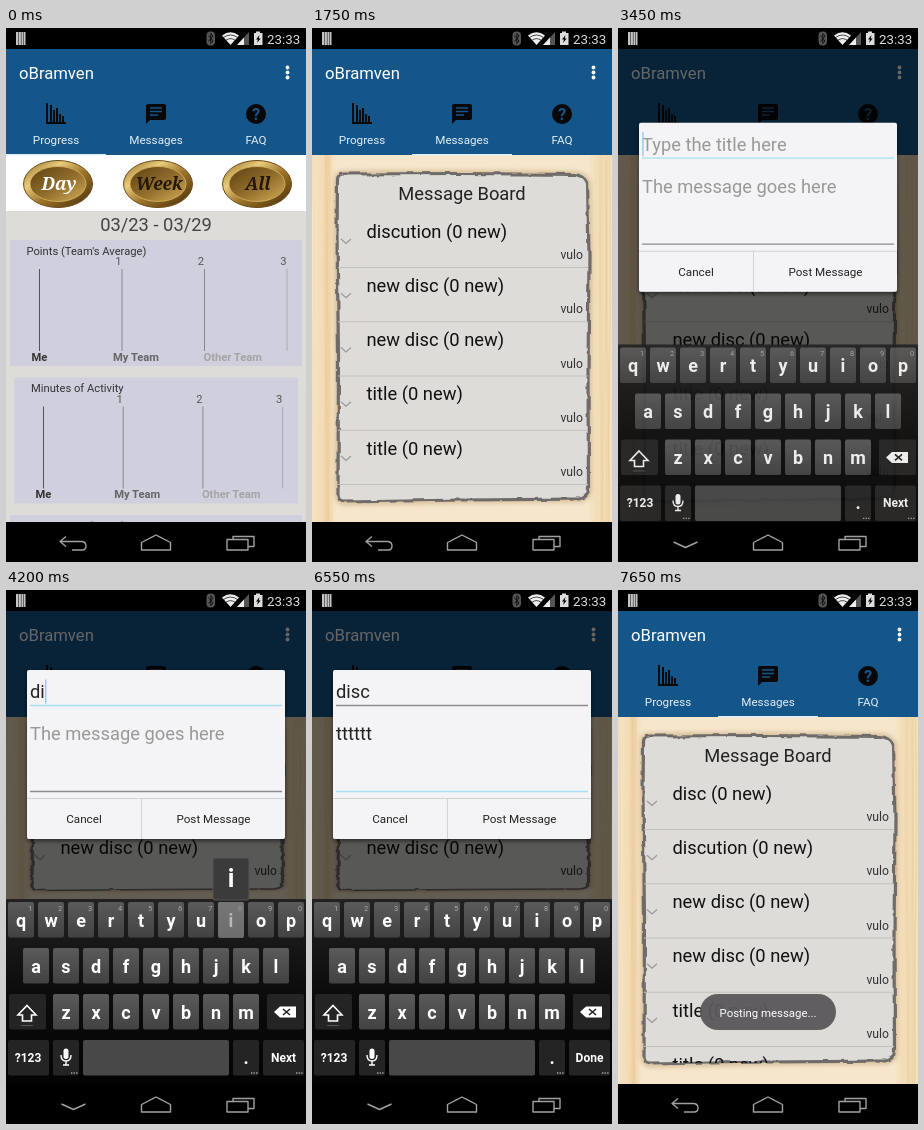
Write an HTML page that moves like this. It is 300 by 534 pixels and loops after 8000 ms.

```html
<!DOCTYPE html>
<html lang="en">
<head>
<meta charset="utf-8">
<style>
html, body { margin: 0; height: 100%; overflow: hidden; background: #000; }
svg { display: block; width: 100vw; height: 100vh; font-family: Roboto, sans-serif; }
.big { font-size: 18.33px; }
.small { font-size: 11.67px; }
.mid { text-anchor: middle; }
.end { text-anchor: end; }
.chart { font-size: 11.2px; }
.btn { font: italic bold 17.5px "Noto Serif", serif; text-anchor: middle; }
.bold { font-weight: 700; }
.icon { fill: none; stroke: #a0a0a0; stroke-width: 1.4; stroke-linejoin: round; }
</style>
</head>
<body>
<svg viewBox="0 0 300 534">
  <defs>
    <linearGradient id="rim" x2="1" y2="1">
      <stop stop-color="#8c6420"/><stop offset=".3" stop-color="#e9cc7c"/>
      <stop offset=".55" stop-color="#a0752a"/><stop offset="1" stop-color="#3f2806"/>
    </linearGradient>
    <linearGradient id="face" x2="1" y2="1">
      <stop stop-color="#5d3f10"/><stop offset=".55" stop-color="#94702f"/><stop offset="1" stop-color="#d3ab55"/>
    </linearGradient>
    <linearGradient id="plank">
      <stop stop-color="#f5e3c3"/><stop offset=".05" stop-color="#f2d9b0"/>
      <stop offset=".08" stop-color="#f6e6cb"/><stop offset=".92" stop-color="#f6e6cb"/>
      <stop offset=".95" stop-color="#f3dcb6"/><stop offset="1" stop-color="#f4e0bd"/>
    </linearGradient>
    <linearGradient id="kbBg" x2="0" y2="1">
      <stop stop-color="#222"/><stop offset=".5" stop-color="#0c0c0c"/><stop offset="1" stop-color="#030303"/>
    </linearGradient>
    <linearGradient id="key" x2="0" y2="1">
      <stop stop-color="#5a5a5a"/><stop offset="1" stop-color="#424242"/>
    </linearGradient>
    <filter id="shadow" x="-10%" y="-10%" width="120%" height="125%">
      <feDropShadow dx="0" dy="2" stdDeviation="2" flood-opacity=".55"/>
    </filter>
    <filter id="rough" color-interpolation-filters="sRGB">
      <feTurbulence type="fractalNoise" baseFrequency=".07" numOctaves="2" seed="3"/>
      <feDisplacementMap in="SourceGraphic" scale="5" xChannelSelector="R" yChannelSelector="G"/>
      <feGaussianBlur stdDeviation=".7"/>
    </filter>
    <filter id="soft"><feGaussianBlur stdDeviation="2"/></filter>
    <clipPath id="listClip"><rect id="listBox" x="24" y="180" width="253" height="293"/></clipPath>
    <path id="board" d="M31 19L150 18.500L262 19.500Q273 20 275.500 28L277 100L276 220L276.500 334Q276 343 267 344L150 345L32 347Q26 346 26 339L26.500 200L25 80L25.500 24Q26 19 31 19Z"/>
  </defs>

  <g id="progress">
    <rect y="127" width="300" height="367" fill="#dddcd8"/>
    <rect y="127" width="300" height="56" fill="#fff"/>
    <g id="buttons"></g>
    <text class="big mid" x="150" y="203" fill="#444">03/23 - 03/29</text>
    <g id="charts"></g>
  </g>

  <g id="messages">
    <g id="wood">
      <rect width="300" height="367" fill="url(#plank)"/>
      <g id="grain" fill="none" stroke="#e0bd85"></g>
      <use href="#board" fill="none" stroke="#c4a880" stroke-width="7" opacity=".6" filter="url(#soft)"/>
      <use href="#board" fill="#dedcd8" stroke="#6f6b69" stroke-width="3.2" filter="url(#rough)"/>
    </g>
    <text class="big mid" x="150" y="172" fill="#222">Message Board</text>
    <g clip-path="url(#listClip)"><g id="rows"></g></g>
  </g>

  <g id="header">
    <rect y="21" width="300" height="106" fill="#15568a"/>
    <text x="13" y="51" font-size="16.67" fill="#fff">oBramven</text>
    <g fill="#fff"><circle cx="281.500" cy="39.500" r="1.9"/><circle cx="281.500" cy="44.500" r="1.9"/><circle cx="281.500" cy="49.500" r="1.9"/></g>
    <rect id="tabPress" x="100" y="68" width="100" height="59" fill="#fff"/>
    <path d="M41 75V95H60M45 77V94M48 82V94M51 80V94M54 86V94M57 88V94" fill="none" stroke="#080808" stroke-width="1.9"/>
    <path d="M142 76H158Q160 76 160 78V90Q160 92 158 92H144L140 96V78Q140 76 142 76Z" fill="#080808"/>
    <path d="M144 80H156M144 83.500H156M144 87H152" stroke="#15568a" stroke-width="1.4"/>
    <circle cx="250" cy="86" r="10" fill="#080808"/>
    <text class="mid bold" x="250" y="92" font-size="16.500" fill="#15568a">?</text>
    <g class="small mid" fill="#e4eef5">
      <text x="50" y="116">Progress</text><text x="150" y="116">Messages</text><text x="250" y="116">FAQ</text>
    </g>
    <rect id="bar" y="126" width="100" height="1.700" fill="#e4f0f8"/>
  </g>

  <g id="menu" filter="url(#shadow)">
    <rect x="124" y="27" width="172" height="122" rx="1.5" fill="#f4f3f5"/>
    <rect id="menuPress" x="124" y="28" width="172" height="40" fill="#ccc"/>
    <g font-size="13.33" fill="#222">
      <text x="138" y="53">Post Message</text><text x="138" y="93">Refresh</text><text x="138" y="133">Settings</text>
    </g>
  </g>
  <rect id="dim" y="21" width="300" height="473"/>

  <g id="dialog">
    <rect width="258" height="169" rx="2" fill="#f4f3f5" filter="url(#shadow)"/>
    <rect id="postPress" x="114" y="128" width="144" height="41" fill="#bfe3f2"/>
    <text id="title" class="big" x="3" y="28"></text>
    <text id="body" class="big" x="3" y="70"></text>
    <path id="line1" d="M3 35.5H255" stroke-width="1.3"/>
    <path id="line2" d="M3 121.5H255" stroke-width="1.3"/>
    <rect id="caret" width="1.4" height="24" fill="#8fcdf0"/>
    <path d="M0 128.5H258M114.5 128V169" stroke="#d2d1d3"/>
    <g class="small mid" fill="#222"><text x="57" y="153">Cancel</text><text x="186.5" y="153">Post Message</text></g>
    <circle id="touch" cx="167" cy="80" r="8.5" fill="#fff" fill-opacity=".4" stroke="#e6e5e8"/>
  </g>

  <g id="keyboard">
    <rect y="309" width="300" height="185" fill="url(#kbBg)"/>
    <g id="keys"></g>
    <path d="M21 415.500L30 425H25.500V431H16.500V425H12Z" fill="none" stroke="#fff" stroke-width="1.6"/>
    <path d="M15 435.500H27" stroke="#555"/>
    <path d="M268 422L274 416.500H290V427.500H274Z" fill="#fff"/>
    <path d="M277 419L284 425M284 419L277 425" stroke="#222" stroke-width="1.6"/>
    <rect x="57.500" y="458.500" width="5" height="10.500" rx="2.500" fill="#fff"/>
    <path d="M55 465Q55 471 60 471T65 465M60 471V475M57 475H63" fill="none" stroke="#fff" stroke-width="1.4"/>
    <g class="mid bold" fill="#fff">
      <text x="22" y="472" font-size="12">?123</text><text x="240" y="474" font-size="18">.</text>
      <text id="action" x="277.500" y="472" font-size="12"></text>
    </g>
    <path d="M65 483H72M245 483H252M290 483H297" stroke="#aaa" stroke-width="1.3" stroke-dasharray="1.3 1.3"/>
    <g id="pop">
      <rect x="-13" y="-18" width="26" height="36" rx="2" fill="#8a8a8a" fill-opacity=".6"/>
      <rect x="-18" y="-62" width="36" height="42" rx="2" fill="#3b3b3b" stroke="#555"/>
      <text id="popText" class="mid bold" y="-33" font-size="25" fill="#fff"></text>
    </g>
  </g>

  <rect width="300" height="21"/>
  <path d="M10 4H12.200V17H10ZM12.700 4H14.900V17H12.700ZM15.400 4H17.200V17H15.400ZM17.700 4H19.500V17H17.700Z" fill="#c4c4c4"/>
  <rect x="200.500" y="3.500" width="8.500" height="14" rx="4" fill="#555"/>
  <path d="M202.500 7.500L207 13L204.800 15.500V5.500L207 8L202.500 13.500" fill="none" stroke="#111"/>
  <path d="M216 7.500Q224.500 1 233 7.500L224.500 17Z" fill="#eee"/>
  <path d="M217.500 9.500Q224.500 4.500 231.500 9.500M220 12.200Q224.500 9 229 12.200" fill="none" stroke="#000" stroke-width=".7"/>
  <path d="M231 17L243 4V17Z" fill="#555"/><path d="M231 17L238 9.500V17Z" fill="#eee"/>
  <path d="M248 5H250V3.500H254V5H256.500V17H248Z" fill="#ddd"/>
  <path d="M253.500 7L250 11.500H252L251 15L254.700 10.500H252.700Z"/>
  <text x="261" y="15.500" font-size="13.33" fill="#ddd">23:33</text>

  <rect y="494" width="300" height="40"/>
  <path id="back" class="icon"/>
  <path class="icon" d="M135.500 522V514.500L150 507L164.500 514.500V522ZM221 511.500H242V522H221ZM227 511V508.500H248V518.500H242.500"/>

  <g id="toast">
    <rect x="82" y="404" width="136" height="36" rx="18" fill="#5a585b" fill-opacity=".95"/>
    <text class="mid" x="150" y="426.500" font-size="11.400" fill="#fff">Posting message...</text>
  </g>
</svg>
<script>
const $ = id => document.getElementById(id);
const set = (id, attrs) => { for (const k in attrs) $(id).setAttribute(k, attrs[k]); };
const fade = (id, a) => set(id, { opacity: a, visibility: a > 0 ? 'visible' : 'hidden' });
const clamp = v => Math.max(0, Math.min(1, v));
const out = (u, power) => 1 - (1 - u) ** power;

// Static parts
$('buttons').innerHTML = [['Day', 52, '#fff'], ['Week', 152, '#241808'], ['All', 251, '#241808']].map(([s, x, c]) =>
  `<ellipse cx="${x}" cy="156" rx="34.5" ry="23.5" fill="url(#rim)" stroke="#6b4a16"/>
   <ellipse cx="${x}" cy="156" rx="28" ry="17.5" fill="url(#face)" stroke="#d9b662" stroke-width=".8"/>
   <text class="btn" x="${x + 1}" y="162" fill="${c}">${s}</text>`).join('');

function chart(name, x, y, width, first, gap) {
  const lines = [0, 1, 2, 3].map(i => {
    const lx = first + i * gap;
    return `<path d="M${lx} ${y + 29}V${y + 111}" stroke="${['#555', '#888', '#888', '#aaa'][i]}"/>` +
      (i ? `<text class="mid" x="${lx - 3.5}" y="${y + 25}" fill="#555">${i}</text>` : '');
  }).join('');
  const labels = [['Me', -8, '#333'], ['My Team', gap - 9, '#666'], ['Other Team', gap * 2 - 1, '#a5a5a5']].map(
    ([s, dx, c]) => `<text class="bold" x="${first + dx}" y="${y + 120.5}" fill="${c}">${s}</text>`).join('');
  return `<g class="chart"><rect x="${x}" y="${y}" width="${width}" height="126" fill="#cfcfdd"/>
    <text x="${x + 16.5}" y="${y + 14.5}" fill="#333">${name}</text>${lines}${labels}</g>`;
}
$('charts').innerHTML = chart("Points (Team's Average)", 4, 212, 292, 33.5, 82.5) +
  chart('Minutes of Activity', 8.5, 349.5, 283.5, 37.5, 79.7) +
  chart('Time Sitting (hours)', 4, 487, 292, 33.5, 82.5);

// Grain runs along the two side planks
let seed = 7;
const rnd = () => (seed = seed * 16807 % 2147483647) / 2147483647;
$('grain').innerHTML = Array.from({ length: 14 }, (_, i) => {
  const x = (i % 2 ? 281 : 1) + rnd() * 18, bend = rnd() * 5 - 2.5;
  return `<path d="M${x} 0Q${x + bend} 120 ${x} 200T${x - bend} 367" stroke-width="${1 + rnd() * 2}" opacity="${.08 + rnd() * .2}"/>`;
}).join('');

const rowGap = 54.25;
$('rows').innerHTML = ['disc', 'discution', 'new disc', 'new disc', 'title', 'title'].map((s, i) =>
  `<g id="row${i}" transform="translate(0 ${i * rowGap})">
   <text class="big" x="54.5" y="209.5" fill="#111">${s} (0 new)</text>
   <text class="end" x="271" y="231" font-size="12.2" fill="#333">vulo</text>
   <path d="M29 211L34 215.5L39 211" fill="none" stroke="#999" stroke-width="1.2"/>
   <path d="M26 239.5H276" stroke="#c3c1bd"/></g>`).join('');

const keyAt = {};
const cap = (x, y, w, fill) => `<rect x="${x}" y="${y}" width="${w}" height="35.5" rx="2" fill="${fill}"/>`;
$('keys').innerHTML = [['qwertyuiop', 15], ['asdfghjkl', 30], ['zxcvbnm', 60]].map(([letters, x0], r) =>
  [...letters].map((c, i) => {
    const x = x0 + i * 30, y = 312 + r * 46;
    keyAt[c] = [x, y + 18];
    return cap(x - 13, y, 26, 'url(#key)') +
      `<text class="mid bold" x="${x}" y="${y + 24.5}" font-size="18" fill="#fff">${c}</text>` +
      (r ? '' : `<text class="mid" x="${x + 9}" y="${y + 8.5}" font-size="7.5" fill="#aaa">${(i + 1) % 10}</text>`);
  }).join('')).join('') +
  [[3, 404, 37], [261, 404, 37], [2, 450, 41], [47, 450, 26], [227, 450, 26], [257, 450, 41]].map(
    k => cap(...k, '#242424')).join('') + cap(77, 450, 146, '#484848');

// Key presses: time, letter, hold
const titleKeys = [[3800, 'd', 200], [4150, 'i', 150], [4350, 's', 150], [4550, 'c', 150]];
const bodyKeys = Array.from({ length: 6 }, (_, i) => [5350 + i * 90, 't', 50]);
const allKeys = [...titleKeys, ...bodyKeys];

function field(id, keys, hint, t) {
  const typed = keys.filter(k => k[0] <= t).map(k => k[1]).join('');
  const el = $(id);
  el.textContent = typed || hint;
  el.setAttribute('fill', typed ? '#222' : '#999');
  return typed ? el.getComputedTextLength() : 0;
}

function draw(t) {
  const ramp = (a, b) => clamp((t - a) / (b - a));
  const during = (a, b) => t >= a && t < b ? 1 : 0;

  // Tab change
  const slide = out(ramp(480, 750), 3);
  set('progress', { transform: `translate(${-300 * slide} 0)` });
  set('messages', { transform: `translate(${300 - 300 * slide} 0)` });
  set('bar', { x: 100 * slide });
  fade('tabPress', during(450, 750) * .25 * (1 - ramp(500, 750)));

  // Message list
  const short = during(3550, 7150), posted = t >= 7450;
  set('wood', { transform: `translate(0 127) scale(1 ${short ? .5 : 1})` });
  set('listBox', { height: short ? 111 : 293 });
  set('rows', { transform: `translate(0 ${posted ? 0 : -rowGap})` });
  fade('row0', posted ? 1 : 0);

  // Popup menu
  const menu = out(ramp(1800, 2150), 3);
  const s = .6 + .4 * menu;
  set('menu', { transform: `translate(296 27) scale(${s}) translate(-296 -27)` });
  fade('menu', menu * (1 - ramp(2630, 2780)));
  fade('menuPress', during(2600, 2780));

  // Dialog
  const open = out(ramp(2700, 3000), 5), close = ramp(7050, 7250);
  const top = 172.5 - 92.5 * out(ramp(3270, 3665), 3);
  const zoom = .9 + .1 * open - .05 * close;
  set('dialog', { transform: `translate(150 ${top + 84.5}) scale(${zoom}) translate(-129 -84.5)` });
  fade('dialog', open * (1 - close));
  fade('dim', .6 * (ramp(2710, 2990) - ramp(7100, 7350)));
  fade('postPress', during(7000, 7200));
  fade('touch', during(4850, 5350));

  const inBody = t >= 4900;
  const titleW = field('title', titleKeys, 'Type the title here', t);
  const bodyW = field('body', bodyKeys, 'The message goes here', t);
  set('line1', { stroke: inBody ? '#8d8d8d' : '#a9dff5' });
  set('line2', { stroke: inBody ? '#a9dff5' : '#8d8d8d' });
  set('caret', { x: 3.2 + (inBody ? bodyW : titleW), y: inBody ? 51 : 9.5 });
  const blinkOff = t >= 5800 && Math.floor((t - 5800) / 250) % 2;
  fade('caret', blinkOff || during(5150, 5350) ? 0 : open * (1 - close));

  // Keyboard
  const kb = out(ramp(3230, 3650), 3) - ramp(7150, 7350) ** 2;
  set('keyboard', { transform: `translate(0 ${70 * (1 - kb)})` });
  fade('keyboard', kb);
  $('action').textContent = inBody ? 'Done' : 'Next';
  const press = allKeys.find(([at, , hold]) => t >= at && t < at + hold);
  fade('pop', press ? 1 : 0);
  if (press) {
    set('pop', { transform: `translate(${keyAt[press[1]]})` });
    $('popText').textContent = press[1];
  }
  set('back', { d: during(3250, 7200) ? 'M55.500 514L67.500 519.500L79.500 514'
    : 'M60 508.500L54 513.500L60 518.500M54.500 513.500H76Q80 514 80 518T76 522H66' });

  fade('toast', ramp(7430, 7650));
}

const start = performance.now();
(function frame() {
  draw((performance.now() - start) % 8000);
  requestAnimationFrame(frame);
})();
</script>
</body>
</html>
```
